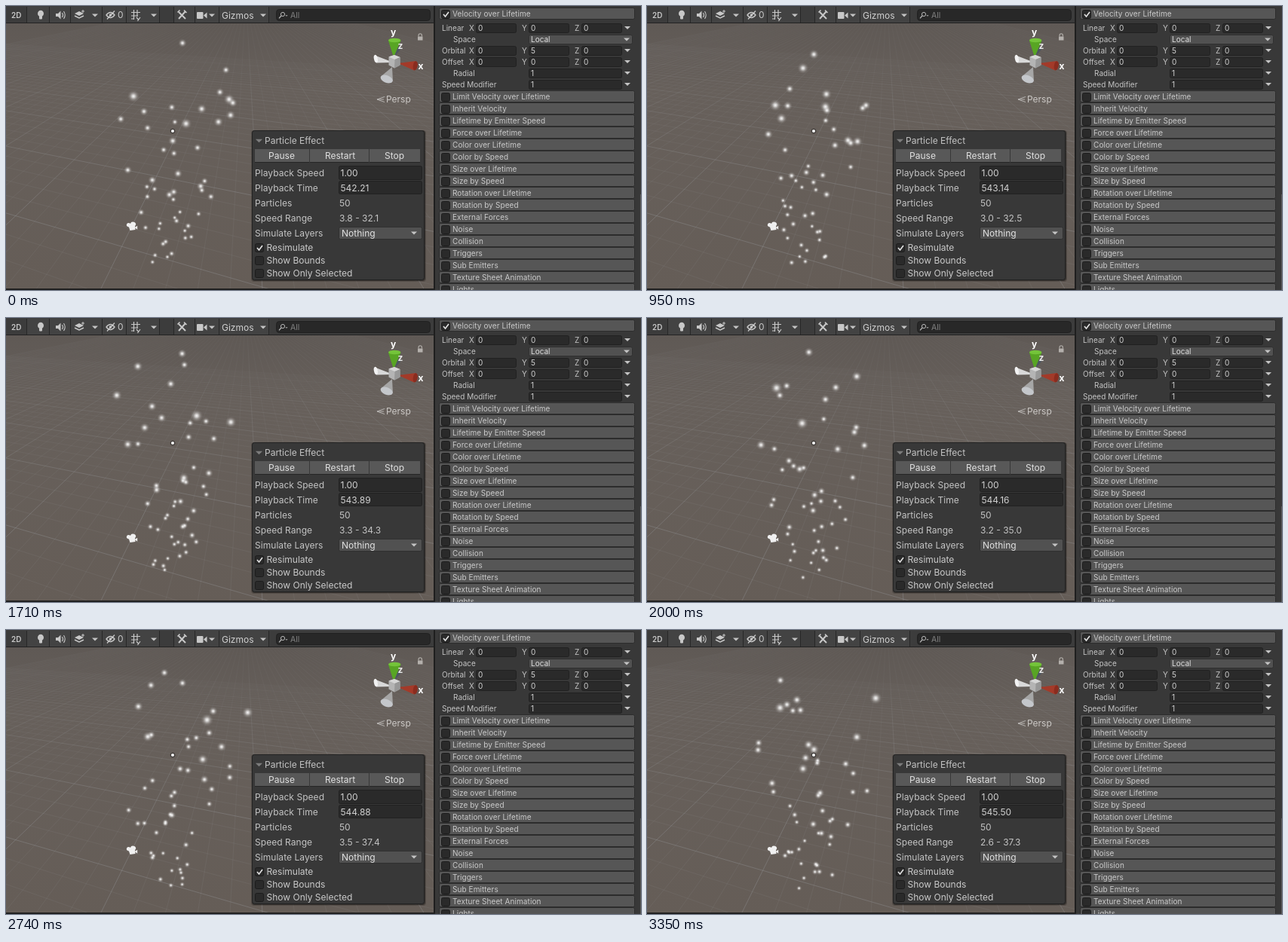
An HTML page with a canvas for the animation above (3.42 s loop, 842x377 px).

```html
<!DOCTYPE html>
<html lang="en">
<head>
<meta charset="utf-8">
<title>Particle Effect</title>
<style>
html, body { margin: 0; width: 100%; height: 100%; overflow: hidden; background: #383838; }
canvas, svg { position: absolute; left: 0; top: 0; width: 842px; height: 377px; display: block; }
text { font-family: Inter, Roboto, sans-serif; white-space: pre; }
</style>
</head>
<body>
<canvas id="scene" width="842" height="377"></canvas>
<svg id="ui" viewBox="0 0 842 377"></svg>
<script>
const LOOP = 3420, FRAMES = 50, LIFE = 5, RATE = 10;
const ctx = document.getElementById('scene').getContext('2d');

// ---------- interface ----------
const parts = [];
const add = s => parts.push(s);
const rect = (x, y, w, h, fill, stroke, r = 0) =>
  add(`<rect x="${x}" y="${y}" width="${w}" height="${h}" rx="${r}" fill="${fill}"${stroke ? ` stroke="${stroke}"` : ''}/>`);
const path = (d, fill = 'none', stroke = 'none', w = 1) =>
  add(`<path d="${d}" fill="${fill}" stroke="${stroke}" stroke-width="${w}"/>`);
const oval = (x, y, rx, ry, fill, turn = 0) =>
  add(`<ellipse cx="${x}" cy="${y}" rx="${rx}" ry="${ry}" fill="${fill}" transform="rotate(${turn} ${x} ${y})"/>`);
const label = (x, y, s, size = 10, fill = '#c4c4c4', extra = '') =>
  add(`<text x="${x}" y="${Math.round(y + size * 0.36)}" font-size="${size}" fill="${fill}" ${extra}>${s}</text>`);
const caret = (x, y, s = 4, fill = '#c4c4c4') => path(`M${x - s} ${y - s / 2}h${2 * s}l${-s} ${s}z`, fill);
const field = (x, y, w, h) => rect(x + .5, y + .5, w - 1, h - 1, '#2a2a2a', '#212121', 2);
const drop = (x, y, w, h) => rect(x + .5, y + .5, w - 1, h - 1, '#515151', '#303030', 2);
const check = (x, y, on) => {
  rect(x + .5, y - 5.5, 11, 11, '#2a2a2a', '#1c1c1c', 2);
  if (on) path(`M${x + 3} ${y}l2.5 3l4.5 -6`, 'none', '#e4e4e4', 1.6);
};

function toolbar() {
  rect(0, 0, 568, 22, '#3c3c3c');
  rect(28, 1, 175, 21, '#434343');
  rect(223, 1, 125, 21, '#434343');
  rect(0, 22, 568, 1, '#222');
  for (const x of [27, 57, 85, 127, 159, 203, 222, 250, 282, 348]) rect(x, 1, 1, 21, '#272727');
  const c = '#c8c8c8';
  label(7, 12, '2D', 10, c, 'font-weight="600"');
  oval(46, 10, 4, 4.3, c);
  rect(44, 13, 4, 4.5, c, '', 1);
  path('M66 10h3l3.5 -3.5v11l-3.5 -3.5h-3z', c);
  path('M74.5 9q2 3 0 6M76.5 7q3.4 5 0 10', 'none', c, 1.1);
  path('M91 10l6 -3l6 3l-6 3z', c);
  path('M91 13l6 3l6 -3', 'none', c, 1.4);
  path('M102 5v4M100 7h4', 'none', c, 1);
  path('M133 12q5.5 -7 11 0q-5.5 7 -11 0zM134 17.5l10 -11', 'none', c, 1.3);
  oval(138.5, 12, 1.8, 1.8, c);
  label(148, 12, '0', 12, c);
  path('M166 8.5h12M166 13h9M169.5 5v13M174 5v9M166 17h4', 'none', c, 1.2);
  path('M173 15l2.5 3M178 15l-3.5 5', 'none', c, 1.2);
  path('M229 8l9 9M238 7l-9 10', 'none', c, 2);
  path('M227.5 8.5l3 -3M236 5.5l3.5 3.5', 'none', c, 1.6);
  rect(253, 8, 8.5, 9, c, '', 1);
  path('M262 12.5l4.5 -4v8z', c);
  for (const x of [118, 196, 273, 341]) caret(x, 12.5);
  label(286, 12.5, 'Gizmos', 12, '#d0d0d0');
  rect(358.5, 4.5, 204, 15, '#282828', '#202020', 4);
  add('<circle cx="367" cy="11" r="2.6" fill="none" stroke="#b8b8b8"/>');
  path('M365 13l-3 3.4', 'none', '#b8b8b8', 1.2);
  caret(372, 13, 1.6, '#b8b8b8');
  label(377, 12, 'All', 10.5, '#808080');
}

function axes() {
  path('M515 67l4.5 -13l5 2z', '#4d5560');
  path('M514 75L489 65.5L491 75.5z', '#d8d8d8');
  oval(490.3, 70, 2.4, 5.2, '#f2f2f2', -12);
  path('M514 68L507 46h16.5z', '#58a524');
  oval(515.2, 45.5, 8.2, 2.8, '#74c43a');
  path('M520 76L543.5 73L541 85.5z', '#a33a29');
  oval(542.8, 79.3, 3, 6.2, '#8a2c1f', 10);
  path('M507.5 67.5l7.5 -2.5l7.5 3v10.5l-7.5 4l-7.5 -4z', '#b4b4b4');
  path('M507.5 67.5l7.5 -2.5l7.5 3l-7 3z', '#d6d6d6');
  path('M515.5 71l7 -3v10.5l-7.5 4z', '#989898');
  path('M512 81L497 93.5L513 100z', '#a6a6a6');
  oval(504.7, 97, 8.4, 4.8, '#c4c7cb', 22);
  label(510, 34.5, 'y', 12, '#fff', 'font-weight="700"');
  label(519.5, 53, 'z', 12, '#e8e8e8', 'font-weight="700"');
  label(546.5, 80, 'x', 12, '#fff', 'font-weight="700"');
  rect(546, 40.5, 6.5, 5, '#b4b0ac');
  path('M547 40.5v-1.6a2.2 2.2 0 0 1 4.4 0v1.6', 'none', '#b4b0ac', 1.1);
  path('M502 120.5l-10 3.5l10 3.5M492 124h9', 'none', '#b8b5b2', 1);
  label(504, 124, 'Persp', 12, '#cbc8c5');
}

function sceneIcons() {
  add('<circle cx="221" cy="166" r="2.7" fill="#f4f4f4" stroke="#3f3b38" stroke-width="1.2"/>');
  oval(163, 290.8, 3.2, 2.6, '#f0f0f0', 15);
  oval(168.6, 289.6, 3.6, 2.9, '#f0f0f0', 15);
  path('M162.5 292l8.5 -.5l.5 5.5l-7 1z', '#f0f0f0');
  path('M170.5 294l3.7 -2.2v5z', '#f0f0f0');
}

function effectPanel() {
  rect(325, 165, 232, 201, 'rgba(0,0,0,.18)', '', 4);
  rect(326, 165, 230, 200, 'rgba(0,0,0,.35)', '', 4);
  rect(326.5, 165.5, 228, 198, '#383838', '#222', 3);
  caret(335.5, 179, 4.6, '#7c7c7c');
  label(343, 179, 'Particle Effect', 12);
  [['Pause', 330, 72, 365.5], ['Restart', 403, 78, 443], ['Stop', 482, 67, 515]].forEach(([s, x, w, mid]) => {
    rect(x, 190, w, 17, '#585858');
    rect(x, 207, w, 1, '#262626');
    label(mid, 198.7, s, 12, '#e0e0e0', 'text-anchor="middle"');
  });
  ['Playback Speed', 'Playback Time', 'Particles', 'Speed Range', 'Simulate Layers']
    .forEach((s, i) => label(330, 222 + 20 * i, s, 12, '#c4c4c4', 'letter-spacing=".05"'));
  field(441, 212, 111, 19);
  field(441, 232, 111, 18);
  label(443.5, 222, '1.00', 12, '#d2d2d2');
  label(443.5, 242, '', 12, '#d2d2d2', 'id="clock"');
  label(442, 262, '50', 12);
  label(442, 282, '', 12, '#c4c4c4', 'id="range"');
  drop(441, 293, 111, 17);
  label(445, 301.5, 'Nothing', 12, '#e2e2e2');
  caret(541, 301.5);
  ['Resimulate', 'Show Bounds', 'Show Only Selected'].forEach((s, i) => {
    check(330, 321 + 17 * i, i === 0);
    label(345.5, 321 + 17 * i, s, 12, '#cacaca');
  });
}

function moduleBar(y, s, on) {
  rect(574.5, y - 7.5, 259, 15, '#565656', '#2c2c2c', 2);
  check(577, y + 1, on);
  label(592, y + .5, s, 10, '#cacaca', 'letter-spacing=".08"');
}

function inspector() {
  rect(567, 0, 2, 377, '#1f1f1f');
  rect(569, 0, 273, 377, '#383838');
  rect(841, 250, 1, 127, '#5a5a5a');
  moduleBar(10, 'Velocity over Lifetime', true);
  [['Linear', 29, 0], ['Orbital', 59, 5], ['Offset', 74, 0]].forEach(([s, y, mid]) => {
    label(578, y, s);
    [['X', 614, 623, 0], ['Y', 684, 693, mid], ['Z', 754, 763, 0]].forEach(([axis, ax, x, v]) => {
      label(ax, y, axis);
      field(x, y - 6, 54, 13);
      label(x + 3, y, v, 10, '#d2d2d2');
    });
    caret(824, y);
  });
  label(593, 44, 'Space');
  drop(693, 38, 138, 13);
  label(696, 44, 'Local', 10, '#e0e0e0');
  caret(823, 44.5);
  [['Radial', 593, 89], ['Speed Modifier', 578, 104]].forEach(([s, x, y]) => {
    label(x, y, s);
    field(693, y - 6, 124, 13);
    label(696, y, 1, 10, '#d2d2d2');
    caret(824, y);
  });
  ['Limit Velocity over Lifetime', 'Inherit Velocity', 'Lifetime by Emitter Speed', 'Force over Lifetime',
    'Color over Lifetime', 'Color by Speed', 'Size over Lifetime', 'Size by Speed', 'Rotation over Lifetime',
    'Rotation by Speed', 'External Forces', 'Noise', 'Collision', 'Triggers', 'Sub Emitters',
    'Texture Sheet Animation', 'Lights'].forEach((s, i) => moduleBar(120 + 16 * i, s, false));
}

sceneIcons();
axes();
effectPanel();
toolbar();
rect(0, 375, 568, 2, '#202020');
inspector();
const ui = document.getElementById('ui');
ui.innerHTML = parts.join('');
const clock = ui.querySelector('#clock'), range = ui.querySelector('#range');

// ---------- ground ----------
function makeGround() {
  const c = document.createElement('canvas');
  c.width = 568;
  c.height = 377;
  const g = c.getContext('2d');
  const sky = g.createLinearGradient(0, 23, 0, 377);
  sky.addColorStop(0, '#5f5955');
  sky.addColorStop(.25, '#67605b');
  sky.addColorStop(1, '#655d57');
  g.fillStyle = sky;
  g.fillRect(0, 0, 568, 377);
  const line = (x1, y1, x2, y2, major) => {
    const fade = g.createLinearGradient(0, 23, 0, 250);
    fade.addColorStop(0, 'rgba(150,152,155,.05)');
    fade.addColorStop(1, `rgba(150,152,155,${major ? .36 : .12})`);
    g.strokeStyle = fade;
    g.beginPath();
    g.moveTo(x1, y1);
    g.lineTo(x2, y2);
    g.stroke();
  };
  // lines running into depth, then lines running across; both meet on the horizon
  const horizon = -14, far = 1000;
  for (let i = -40; i <= 40; i++) line(318, horizon, 125 + i * 43, 377, i % 5 === 0);
  for (let i = 0; i < 45; i++) {
    const drop = 2600 / (5 + i * .8);
    line(0, horizon + drop, 568, horizon + drop * (1 + 568 / far), i % 5 === 0);
  }
  return c;
}
const ground = makeGround();

// ---------- particles ----------
const rnd = (i, k) => {
  const v = Math.sin(i * 127.1 + k * 311.7) * 43758.5453;
  return v - Math.floor(v);
};

function particle(i, now) {
  const age = now - i / RATE;
  if (age < 0 || age >= LIFE) return;
  const a = age / LIFE;
  const turn = rnd(i, 1) * 2 * Math.PI + 5 * age;
  const near = 1 - .14 * Math.cos(turn) * a;
  const r = Math.sqrt(rnd(i, 2)) * (28 + 70 * a) * near;
  const x = 211 + 22 * a + r * Math.sin(turn);
  const y = 340 - 200 * a - 70 * a ** 3 - .5 * r * Math.cos(turn);
  const size = (4 + 3.2 * a * a) * near * (.85 + .25 * rnd(i, 3));
  const glow = ctx.createRadialGradient(x, y, 0, x, y, size);
  [.95, .68, .3, .09, 0].forEach((alpha, n) => glow.addColorStop(n / 4, `rgba(255,255,255,${alpha})`));
  ctx.fillStyle = glow;
  ctx.fillRect(x - size, y - size, 2 * size, 2 * size);
}

// ---------- timing ----------
// time in ms, playback time, lowest and highest speed
const readings = [
  [0, 542.21, 3.8, 32.1], [550, 542.74, 2.7, 31.3], [1370, 543.54, 3.2, 33.8], [1710, 543.89, 3.3, 34.3],
  [2310, 544.48, 3, 35.9], [2740, 544.89, 3.5, 37.4], [3350, 545.5, 2.6, 37.3]
];
const starts = Array.from({ length: FRAMES }, (_, k) => Math.max(0, Math.round(k * 6.84 - .15) * 10));

function readAt(t) {
  let n = 0;
  while (n < readings.length - 2 && t >= readings[n + 1][0]) n++;
  const p = readings[n], q = readings[n + 1];
  const f = (t - p[0]) / (q[0] - p[0]);
  return p.map((v, j) => v + (q[j] - v) * f);
}

// the picture holds between steps; a step may run a little early
let shown = -1;
function draw(ms) {
  const t = ms % LOOP;
  let k = FRAMES - 1;
  while (k && starts[k] > t + 10) k--;
  if (k === shown) return;
  shown = k;
  const [, time, low, high] = readAt(Math.min(starts[k], 3350));
  clock.textContent = time.toFixed(2);
  range.textContent = `${low.toFixed(1)} - ${high.toFixed(1)}`;
  ctx.drawImage(ground, 0, 0);
  const now = LIFE + time - readings[0][1];
  for (let i = 0; i <= now * RATE; i++) particle(i, now);
}

let begin;
function tick(ms) {
  begin ??= ms;
  draw(ms - begin);
  requestAnimationFrame(tick);
}
draw(0);
requestAnimationFrame(tick);
</script>
</body>
</html>
```
